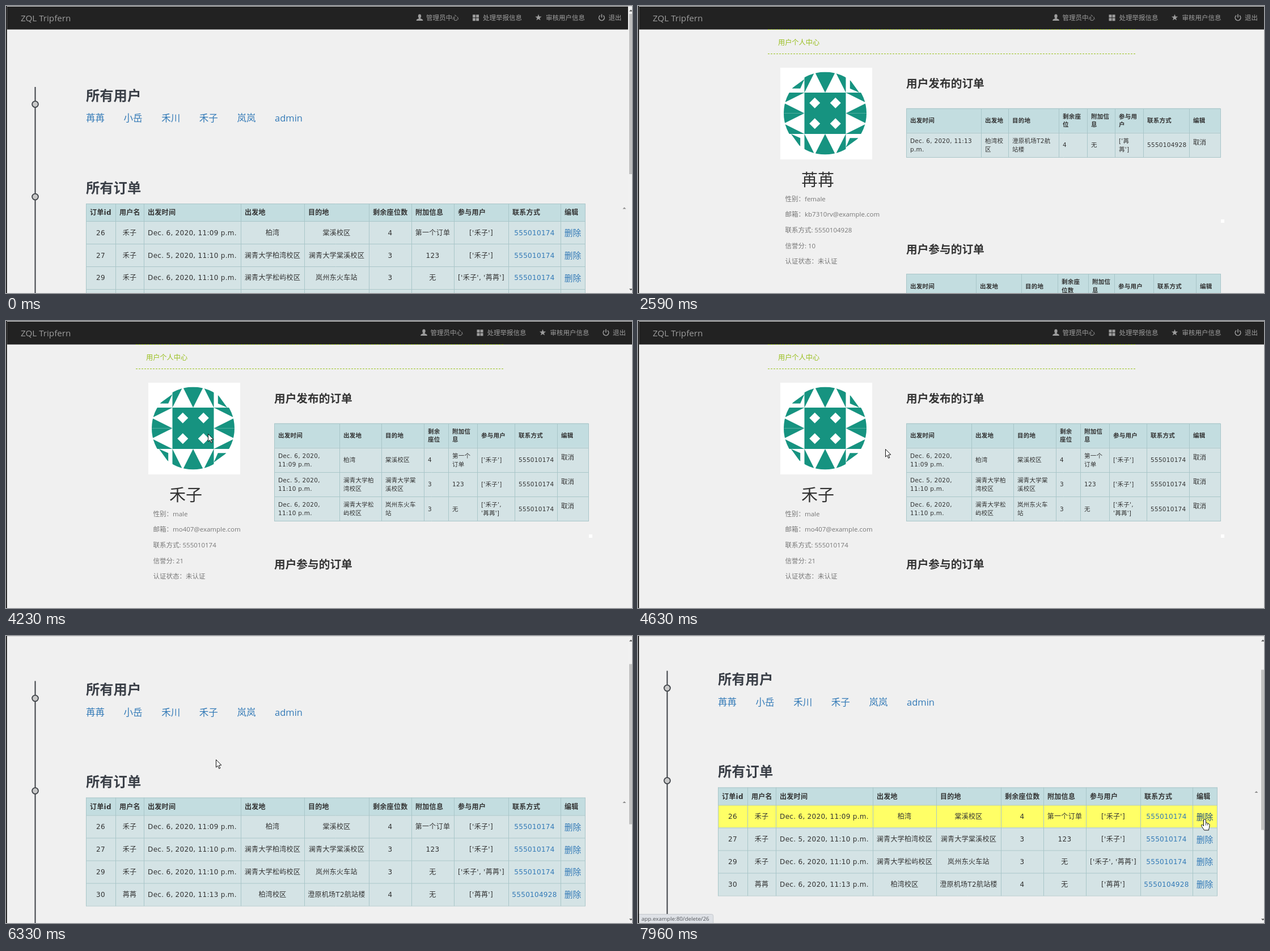
These frames come from a looping animation (1104x507 px, 8000 ms). An HTML page with a canvas:

```html
<!DOCTYPE html>
<html lang="zh">
<head>
<meta charset="utf-8">
<title>Carpool admin</title>
<style>
html, body { margin: 0; width: 100%; height: 100%; overflow: hidden; background: #f0f0f0; }
canvas { display: block; }
</style>
</head>
<body>
<canvas id="stage" width="1104" height="507"></canvas>
<script>
const W = 1104, H = 507, LOOP = 8000;
const ctx = document.getElementById('stage').getContext('2d', { alpha: false });
const UI = '"Open Sans", "Noto Sans CJK SC", "Noto Sans CJK", sans-serif';
const GRID = '"DejaVu Sans", "Noto Sans CJK SC", "Noto Sans CJK", sans-serif';
const LINK = '#337ab7', HOVER = '#23527c', INK = '#333', TITLE = '#3a3f47';

const BRAND = 'ZQL Tripfern';
const USERS = ['苒苒', '小岳', '禾川', '禾子', '岚岚', 'admin'];
const PHONE = '555010174', PHONE2 = '5550104928';

const ORDERS = {
  xs: [141, 193, 243, 414, 526, 640, 715, 790, 886, 978, 1021],
  heads: ['订单id', '用户名', '出发时间', '出发地', '目的地', '剩余座位数', '附加信息', '参与用户', '联系方式', '编辑'],
  rows: [
    ['26', '禾子', 'Dec. 6, 2020, 11:09 p.m.', '柏湾', '棠溪校区', '4', '第一个订单', "['禾子']", PHONE, '删除'],
    ['27', '禾子', 'Dec. 5, 2020, 11:10 p.m.', '澜青大学柏湾校区', '澜青大学棠溪校区', '3', '123', "['禾子']", PHONE, '删除'],
    ['29', '禾子', 'Dec. 6, 2020, 11:10 p.m.', '澜青大学松屿校区', '岚州东火车站', '3', '无', "['禾子', '苒苒']", PHONE, '删除'],
    ['30', '苒苒', 'Dec. 6, 2020, 11:13 p.m.', '柏湾校区', '澄原机场T2航站楼', '4', '无', "['苒苒']", PHONE2, '删除']
  ],
  top: 349, headH: 31.3, rowH: 39.8, size: 12, center: true
};

const SMALL = { headH: 43.3, rowH: 43.1, size: 10.5, top: 180.5 };
const PROFILES = {
  a: {
    name: '苒苒',
    info: ['性别：female', '邮箱：kb7310rv@example.com', '联系方式: ' + PHONE2, '信誉分: 10', '认证状态：未认证'],
    tables: [
      { ...SMALL,
        xs: [473, 605, 653, 742, 792, 841, 891, 972, 1027],
        heads: ['出发时间', '出发地', '目的地', '剩余座\n位', '附加信\n息', '参与用\n户', '联系方式', '编辑'],
        rows: [['Dec. 6, 2020, 11:13\np.m.', '柏湾校\n区', '澄原机场T2航\n站楼', '4', '无', "['苒\n苒']", PHONE2, '取消']] },
      { ...SMALL, top: 473,
        xs: [473, 596, 676, 740, 794, 840, 909, 984, 1027],
        heads: ['出发时间', '出发地', '目的地', '剩余座\n位数', '附加信\n息', '参与用户', '联系方式', '编辑'],
        rows: [] }
    ]
  },
  b: {
    name: '禾子',
    info: ['性别：male', '邮箱：mo407@example.com', '联系方式: ' + PHONE, '信誉分: 21', '认证状态：未认证'],
    tables: [
      { ...SMALL,
        xs: [473, 588, 662, 737, 780, 831, 897, 972, 1027],
        heads: ['出发时间', '出发地', '目的地', '剩余\n座位', '附加信\n息', '参与用户', '联系方式', '编辑'],
        rows: [
          ['Dec. 6, 2020,\n11:09 p.m.', '柏湾', '棠溪校区', '4', '第一个\n订单', "['禾子']", PHONE, '取消'],
          ['Dec. 5, 2020,\n11:10 p.m.', '澜青大学柏\n湾校区', '澜青大学棠\n溪校区', '3', '123', "['禾子']", PHONE, '取消'],
          ['Dec. 6, 2020,\n11:10 p.m.', '澜青大学松\n屿校区', '岚州东火车\n站', '3', '无', "['禾子',\n'苒苒']", PHONE, '取消']
        ] }
    ]
  }
};

// Timeline: [start, end, value]
const PAGES = [[1750, 2820, 'a'], [4230, 5710, 'b']];
const LINK_HOVER = [[1220, 1750, 0], [3440, 3750, 2], [3750, 4230, 3]];
const STATUS = [[1220, 1750, 'check/17'], [3820, 4230, 'check/15'], [7580, LOOP, 'delete/26']];
const HAND_ON = [[980, 1750, true], [3430, 4230, true], [7430, LOOP, true]];
const SCROLL = [[6250, 6330, 32], [6330, 6430, 63.5], [6430, LOOP, 81.5]];

// Pointer paths: [time, x, y]
const LEGS = [
  [[210, 1042, 470], [300, 985, 370], [450, 850, 254], [600, 650, 190], [750, 400, 160],
   [880, 230, 170], [980, 164, 196], [1060, 164, 198], [1800, 164, 198], [2290, 80, -20]],
  [[2980, 90, -5], [3150, 130, 90], [3360, 270, 180], [3500, 340, 196], [3670, 340, 196],
   [3800, 356, 199], [4230, 356, 199], [4560, 436, 226], [4700, 436, 226], [4950, 95, 40],
   [5110, 70, 30], [5390, 40, -18]],
  [[5860, 110, -5], [6250, 370, 218], [6430, 370, 218], [6600, 375, 279], [6720, 410, 302],
   [7100, 800, 318], [7430, 999, 323], [LOOP, 999, 323]]
];
const ARROW = new Path2D('M0 0V13.5L3 10.7L5.2 15.8L7.3 14.9L5.1 9.9L9.3 9.6Z');
const HAND = new Path2D('M-2 1.5Q0 -1 2 1.5V7Q4 5.5 5 7.5Q7 7 7.5 9Q9 9 8.5 11L8 15Q7 17 7 19.5H-1Q-3 16 -6 12Q-6.5 9.5 -4 10L-2 12Z');

function at(spans, t) {
  const hit = spans.find(([from, to]) => t >= from && t < to);
  return hit && hit[2];
}

function rect(x, y, w, h, color) {
  ctx.fillStyle = color;
  ctx.fillRect(x, y, w, h);
}

function poly(points, color) {
  ctx.fillStyle = color;
  ctx.beginPath();
  points.forEach(([x, y]) => ctx.lineTo(x, y));
  ctx.fill();
}

// y is the optical middle of the line
function text(s, x, y, size, color, { font = UI, weight = 400, align = 'left', gap = 0 } = {}) {
  ctx.font = `${weight} ${size}px ${font}`;
  ctx.letterSpacing = gap + 'px';
  ctx.textAlign = align;
  ctx.fillStyle = color;
  ctx.fillText(s, x, y + size * 0.38);
}

function line(x1, y1, x2, y2, color, width = 1) {
  ctx.strokeStyle = color;
  ctx.lineWidth = width;
  ctx.beginPath();
  ctx.moveTo(x1, y1);
  ctx.lineTo(x2, y2);
  ctx.stroke();
}

function cell(s, x, y, size, color, opts) {
  const lines = s.split('\n');
  lines.forEach((part, i) => text(part, x, y + (i - (lines.length - 1) / 2) * 14.5, size, color,
    { font: GRID, gap: size * 0.025, ...opts }));
}

function table(tb, hot = -1, hotLink = false) {
  const { xs, top, headH, rowH, size, center, rows } = tb;
  const left = xs[0], right = xs[xs.length - 1];
  const rowY = i => top + headH + i * rowH;
  rect(left, top, right - left, headH, '#c3dde0');
  tb.heads.forEach((s, i) => cell(s, xs[i] + 7, top + headH / 2, size, INK, { weight: 700 }));
  rows.forEach((row, r) => {
    const mid = rowY(r) + rowH / 2;
    rect(left, rowY(r), right - left, rowH, r === hot ? '#ffff66' : '#d4e3e5');
    row.forEach((s, i) => {
      const last = i === row.length - 1;
      if (!center) {
        if (last) text(s, xs[i] + 7, mid - 4.5, 11.5, INK);
        else cell(s, xs[i] + 7, mid, size, INK);
        return;
      }
      const x = (xs[i] + xs[i + 1]) / 2;
      if (last) text(s, x, mid + 0.5, 14.7, r === hot && hotLink ? HOVER : LINK, { align: 'center' });
      else cell(s, x, mid, size, i === 8 ? LINK : INK, { align: 'center' });
    });
  });
  const bottom = Math.round(rowY(rows.length)) + 0.5;
  xs.forEach(x => line(x + 0.5, Math.round(top), x + 0.5, bottom, '#a9c6c9'));
  [top, ...Array.from({ length: rows.length + 1 }, (_, i) => rowY(i))].forEach(y => {
    const edge = Math.round(y) + 0.5;
    line(left, edge, right + 1, edge, '#a9c6c9');
  });
}

function navIcons() {
  const c = '#9d9d9d';
  ctx.fillStyle = c;
  ctx.beginPath();
  ctx.ellipse(729.5, 18, 2.7, 3.4, 0, 0, 7);
  ctx.fill();
  ctx.fill(new Path2D('M723.8 26V24.5Q724.5 23 728 22V20H731V22Q734.5 23 735.2 24.5V26Z'));
  for (let i = 0; i < 4; i++) rect(823 + (i % 2) * 6, 15.3 + (i >> 1) * 6, 5, 5, c);
  poly(Array.from({ length: 10 }, (_, i) => {
    const r = i % 2 ? 2.4 : 6, a = i * Math.PI / 5;
    return [939 + r * Math.sin(a), 20.5 - r * Math.cos(a)];
  }), c);
  ctx.strokeStyle = c;
  ctx.lineWidth = 1.6;
  ctx.beginPath();
  ctx.arc(1050.5, 20.7, 4.8, -0.95, Math.PI + 0.95);
  ctx.stroke();
  line(1050.5, 14.5, 1050.5, 20.5, c, 1.6);
}

function nav(shift) {
  rect(2, 1, W, 40.5, '#222');
  text(BRAND, 26, 21, 15.2, '#9d9d9d');
  ctx.save();
  ctx.translate(shift, 0);
  navIcons();
  [['管理员中心', 741], ['处理举报信息', 841], ['审核用户信息', 952], ['退出', 1062.5]]
    .forEach(([s, x]) => text(s, x, 21, 11.5, '#9d9d9d'));
  ctx.restore();
}

function scrollbar(scroll) {
  rect(1097, 1, 7, H, '#f1f1f1');
  rect(1099, 14 + scroll * 0.56, 5, 283, '#c1c1c1');
  poly([[1099, 9.5], [1105, 9.5], [1102, 6.5]], '#505050');
  poly([[1099, 499.5], [1105, 499.5], [1102, 502.5]], '#505050');
}

function listPage(t, scroll, mouse) {
  ctx.save();
  ctx.translate(0, -scroll);
  nav(0);
  line(51.5, 143, 51.5, 700, '#3d4146', 2);
  [173.5, 337].forEach(y => {
    ctx.beginPath();
    ctx.arc(51.5, y, 5.4, 0, 7);
    ctx.fillStyle = '#c8c8c8';
    ctx.fill();
    ctx.strokeStyle = '#3d4146';
    ctx.lineWidth = 1.8;
    ctx.stroke();
  });
  text('所有用户', 141, 157.5, 24.3, TITLE, { weight: 700 });
  text('所有订单', 141, 320.5, 24.3, TITLE, { weight: 700 });
  const hotLink = at(LINK_HOVER, t);
  USERS.forEach((s, i) => text(s, 141 + i * 66.6, 198, 16.5, i === hotLink ? HOVER : LINK));
  let hot = -1;
  if (mouse && mouse.x > 141 && mouse.x < 1021)
    hot = Math.floor((mouse.y + scroll - ORDERS.top - ORDERS.headH) / ORDERS.rowH);
  table(ORDERS, hot, at(HAND_ON, t));
  poly([[1087.5, 358.5], [1093.5, 358.5], [1090.5, 355.5]], '#8a8a8a');
  ctx.restore();
  scrollbar(scroll);
}

function avatar() {
  const u = 36.5, teal = '#169380';
  const shape = pts => poly(pts.map(([x, y]) => [x * u, y * u]), teal);
  rect(251, 109, 162, 162, '#fff');
  ctx.save();
  ctx.translate(330, 189.5);
  ctx.beginPath();
  ctx.arc(0, 0, 73, 0, 7);
  ctx.clip();
  rect(-u, -u, 2 * u, 2 * u, teal);
  for (let k = 0; k < 4; k++) {
    for (const x of [-1, 0]) {
      shape([[x, -2], [x + 0.5, -2], [x, -1]]);
      shape([[x + 0.5, -2], [x + 1, -2], [x + 1, -1]]);
    }
    shape([[-1.62, -1.2], [-1, -1.65], [-1.2, -1.2]]);
    const d = u / 2;
    poly([[d, d - 9.5], [d + 9.5, d], [d, d + 9.5], [d - 9.5, d]], '#fff');
    ctx.rotate(Math.PI / 2);
  }
  ctx.restore();
}

function profilePage({ name, info, tables }) {
  nav(7.5);
  ctx.setLineDash([3, 2]);
  line(229, 41.5, 877, 41.5, '#9bc31f');
  line(229, 84.5, 877, 84.5, '#9bc31f');
  ctx.setLineDash([]);
  text('用户个人中心', 247, 64, 12.2, '#99bf1e');
  avatar();
  text(name, 288, 307, 29, INK);
  info.forEach((s, i) => text(s, 259.5, 340.5 + i * 27.6, 11.5, '#777'));
  text('用户发布的订单', 473, 137, 19.7, INK, { weight: 700 });
  text('用户参与的订单', 473, 429.5, 19.7, INK, { weight: 700 });
  tables.forEach(tb => table(tb));
  rect(1028, 377, 6, 6, '#fff');
}

function statusBar(path) {
  const s = 'app.example:80/' + path;
  ctx.font = `9.8px ${UI}`;
  ctx.letterSpacing = '0px';
  const right = 12 + ctx.measureText(s).width;
  ctx.beginPath();
  ctx.roundRect(1, 491.5, right, 20, [0, 3, 0, 0]);
  ctx.fillStyle = '#dee1e6';
  ctx.fill();
  ctx.strokeStyle = '#c6c9ce';
  ctx.lineWidth = 1;
  ctx.stroke();
  text(s, 6, 499.5, 9.8, '#55585c');
}

// The pointer is refreshed about 13 times a second
function pointer(t) {
  const q = t - (t - 210) % 77;
  const leg = LEGS.find(l => t >= l[0][0] && t < l[l.length - 1][0]);
  if (!leg) return null;
  const i = Math.max(1, leg.findIndex(p => p[0] > q));
  const [t0, x0, y0] = leg[i - 1], [t1, x1, y1] = leg[i];
  const k = Math.max(0, (q - t0) / (t1 - t0));
  return { x: x0 + (x1 - x0) * k, y: y0 + (y1 - y0) * k };
}

function drawPointer({ x, y }, hand) {
  const shape = hand ? HAND : ARROW;
  ctx.save();
  ctx.translate(Math.round(x) + 0.5, Math.round(y) + 0.5);
  ctx.fillStyle = '#fff';
  ctx.strokeStyle = '#111';
  ctx.lineWidth = 1;
  ctx.fill(shape);
  ctx.stroke(shape);
  if (hand) [2, 5].forEach(px => line(px, 7.5, px, 11, '#111', 0.8));
  ctx.restore();
}

function draw() {
  const t = performance.now() % LOOP;
  const mouse = pointer(t), page = at(PAGES, t), status = at(STATUS, t);
  rect(0, 0, W, H, '#f0f0f0');
  if (page) profilePage(PROFILES[page]);
  else listPage(t, at(SCROLL, t) || 0, mouse);
  if (status) statusBar(status);
  rect(0, 0, W, 1, '#d4d4d4');
  rect(0, 0, 1.6, H, '#000');
  if (mouse) drawPointer(mouse, at(HAND_ON, t));
  requestAnimationFrame(draw);
}
draw();
</script>
</body>
</html>
```
